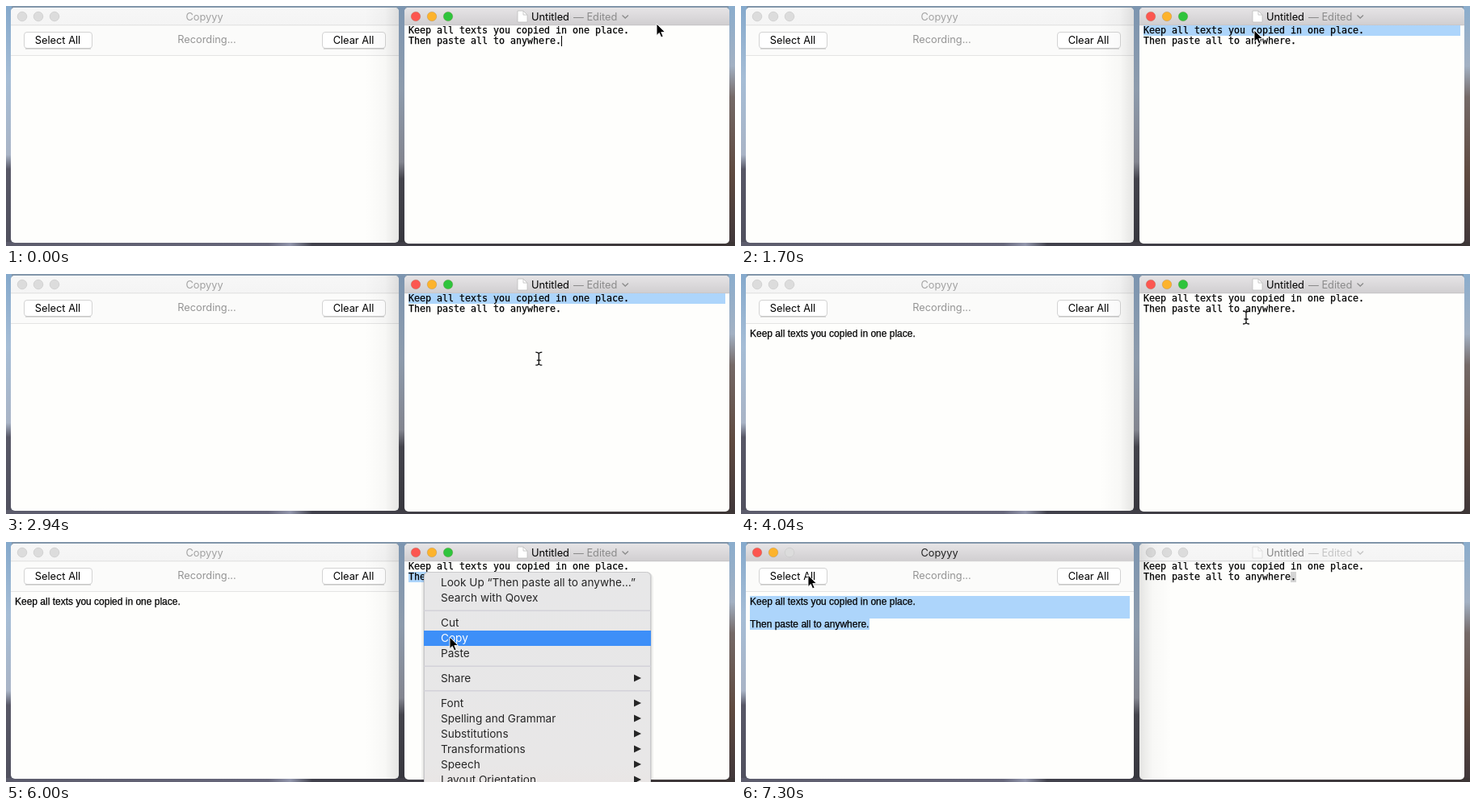
Recreate the animation shown at these times as an HTML page. Size 902x298 px, loop 7.32 s.

```html
<!DOCTYPE html>
<html lang="en">
<head>
<meta charset="utf-8">
<title>Clipboard recorder</title>
<style>
  html, body { margin: 0; width: 100%; height: 100%; overflow: hidden; }
  svg { display: block; width: 902px; height: 298px; }
  text { white-space: pre; }
  .ui { font: 12.8px Inter, Roboto, sans-serif; }
  .menu { font: 13.6px Inter, Roboto, sans-serif; fill: #262626; }
  .mono { font: 11.63px "DejaVu Sans Mono", monospace; }
  .sans { font: 12px "Liberation Sans", sans-serif; }
  .mono, .sans { stroke: #000; stroke-width: .25px; }
  .mid { text-anchor: middle; }
</style>
</head>
<body>
<svg id="stage" viewBox="0 0 902 298"></svg>
<script>
const LOOP = 7320;
const LINE_1 = 'Keep all texts you copied in one place.';
const LINE_2 = 'Then paste all to anywhere.';
const SELECTED = '#add5fb';
const PAPER = '#fefefc';
const stage = document.getElementById('stage');

const rect = (x, y, w, h, fill, extra = '') =>
  `<rect x="${x}" y="${y}" width="${w}" height="${h}" fill="${fill}" ${extra}/>`;
const label = (x, y, cls, str, extra = '') =>
  `<text x="${x}" y="${y}" class="${cls}" ${extra}>${str}</text>`;
const gradient = (id, stops, vertical = true) =>
  `<linearGradient id="${id}" x1="0" y1="0" x2="${vertical ? 0 : 1}" y2="${vertical ? 1 : 0}">` +
  stops.map(([at, color, alpha = 1]) =>
    `<stop offset="${at}" stop-color="${color}" stop-opacity="${alpha}"/>`).join('') +
  '</linearGradient>';

const defs = `<defs>
  ${gradient('barOn', [[0, '#e6e4e6'], [1, '#d0ced0']])}
  ${gradient('barOff', [[0, '#f7f7f7'], [1, '#f4f4f4']])}
  ${gradient('deskLeft', [[0, '#85a9cc'], [.3, '#a5bdd6'], [.62, '#a9b4c6'], [.68, '#575766'], [1, '#50505e']])}
  ${gradient('deskMid', [[0, '#7c95b0'], [.35, '#8d9bac'], [.65, '#83858f'], [.72, '#44444c'], [1, '#36363d']])}
  ${gradient('deskRight', [[0, '#8badcd'], [.25, '#a3b1c3'], [.38, '#756a68'], [.7, '#5f4a40'], [1, '#40373a']])}
  ${gradient('deskFloor', [[0, '#5c5c6c'], [.36, '#66667a'], [.39, '#9195ab'], [.42, '#41414c'], [1, '#3d3636']], false)}
  ${gradient('shadeRight', [[0, '#000', 0], [.6, '#000', .025], [1, '#000', .1]], false)}
  ${gradient('shadeLeft', [[0, '#000', .1], [.4, '#000', .025], [1, '#000', 0]], false)}
  ${gradient('menuFill', [[0, '#e7e7e8'], [.8, '#e8e7e7'], [1, '#ebe3e1']])}
  <clipPath id="clipLeft"><rect x="6" y="2" width="480" height="292" rx="5"/></clipPath>
  <clipPath id="clipRight"><rect x="493" y="2" width="402" height="293" rx="5"/></clipPath>
</defs>`;

const desktop =
  rect(0, 0, 902, 298, '#8397ab') +
  rect(0, 0, 7, 298, 'url(#deskLeft)') +
  rect(485, 0, 9, 298, 'url(#deskMid)') +
  rect(894, 0, 8, 298, 'url(#deskRight)') +
  rect(0, 293, 902, 5, 'url(#deskFloor)');

const lights = (id, x) => `<g id="${id}">` +
  [0, 20, 40].map(dx => `<circle cx="${x + dx}" cy="13" r="5.8" stroke-width=".7"/>`).join('') + '</g>';

const button = (x, w, str) =>
  rect(x + .5, 32.5, w - 1, 20, '#fff', 'rx="3.5" stroke="#d3d3d3"') +
  rect(x + 2, 52.5, w - 4, 1, '#bcbcbc') +
  label(x + w / 2 - .5, 47, 'ui mid', str);

const leftWindow = `<g clip-path="url(#clipLeft)">
  ${rect(6, 2, 480, 292, PAPER)}
  ${rect(6, 24, 480, 38, '#fbfbfa')}
  ${rect(6, 61, 480, 1, '#e4e4e4')}
  ${rect(6, 2, 480, 22, '', 'id="leftBar"')}
  ${rect(6, 23.5, 480, .7, '#d6d6d6')}
  ${lights('leftLights', 20)}
  ${label(245.5, 18, 'ui mid', 'Copyyy', 'id="leftTitle"')}
  ${button(22, 85, 'Select All')}
  ${label(248.5, 46, 'ui mid', 'Recording...', 'fill="#949494"')}
  ${button(391, 79, 'Clear All')}
  <g id="leftSelection">${rect(11, 67, 470, 28, SELECTED)}${rect(11, 95, 148, 14, SELECTED)}</g>
  ${label(11, 78, 'sans', LINE_1, 'id="copied1"')}
  ${label(11, 106, 'sans', LINE_2, 'id="copied2"')}
  ${rect(444, 2, 42, 292, 'url(#shadeRight)', 'id="leftShade"')}
</g>`;

const rightWindow = `<g clip-path="url(#clipRight)">
  ${rect(493, 2, 402, 293, PAPER)}
  ${rect(493, 2, 402, 22, '', 'id="rightBar"')}
  ${rect(493, 23.5, 402, .7, '#c2c0c2')}
  ${lights('rightLights', 507)}
  <g id="rightTitle">
    <path d="M633 6h7l5 5v9h-12z" fill="#fff" stroke="#bdbdbd" stroke-width=".8"/>
    <path d="M640 6v5h5" fill="none" stroke="#bdbdbd" stroke-width=".8"/>
    ${label(650, 18, 'ui', 'Untitled')}
    ${label(702, 18, 'ui', '— Edited', 'fill="#8b8b8b"')}
    <path d="M762.5 11.5l3.7 3.5 3.7-3.5" fill="none" stroke="#8b8b8b" stroke-width="1.3"/>
  </g>
  ${rect(498, 24, 392, 13, SELECTED, 'id="select1"')}
  ${rect(498, 37, 189, 13, SELECTED, 'id="select2"')}
  ${rect(680, 37, 7, 13, '#d4d4d4', 'id="dimSelect"')}
  ${label(498, 34, 'mono', LINE_1)}
  ${label(498, 47, 'mono', LINE_2)}
  ${rect(687, 37, 1, 13, '#000', 'id="caret"')}
  ${rect(493, 2, 40, 293, 'url(#shadeLeft)', 'id="rightShade"')}
</g>`;

// Vertical centres of the rows, relative to the top of the menu.
const ROWS = [13, 32, 63, 82, 101, 132, 163, 182, 201, 220, 239, 258];
const COPY = 3, PASTE = 4;

function menu(id, x, y, width, subject, arrowX, canPaste) {
  const names = [`Look Up “${subject}…”`, 'Search with Qovex', 'Cut', 'Copy', 'Paste', 'Share', 'Font',
    'Spelling and Grammar', 'Substitutions', 'Transformations', 'Speech', 'Layout Orientation'];
  const items = names.map((name, i) => {
    const cy = y + ROWS[i];
    const fill = i === PASTE && !canPaste ? 'fill="#b4b4b4"' : '';
    const arrow = i > PASTE ? `<path d="M${x + arrowX - 4} ${cy - 4.5}l9 4.5-9 4.5z"/>` : '';
    return `<g class="item" ${fill}>${label(x + 21, cy + 5, '', name)}${arrow}</g>`;
  });
  const lines = [48, 117, 147.5].map(dy => rect(x, y + dy - .5, width, 1.5, '#d3d2d9'));
  return `<g id="${id}" class="menu">
    ${rect(x - 3, y + 1, width + 6, 320, '#000', 'rx="7" opacity=".05"')}
    ${rect(x - 1, y, width + 2, 320, '#000', 'rx="6" opacity=".1"')}
    ${rect(x + .5, y + .5, width - 1, 300, 'url(#menuFill)', 'rx="5" stroke="#c9c9cc"')}
    ${lines.join('')}${rect(x, 0, width, 19, '#3d8ff8', 'class="hover"')}${items.join('')}
  </g>`;
}

const cursors = `
  <path id="arrow" d="M0 0v14.5l3.3-3.1 2.3 5.4 2.5-1-2.3-5.3h4.6z" fill="#000" stroke="#fff" stroke-width=".9"/>
  <path id="beam" d="M-4-8q4 0 4 2.5q0-2.5 4-2.5M0-6V6M-4 8q4 0 4-2.5q0 2.5 4 2.5M-2.5 2h5"
    fill="none" stroke="#111" stroke-width="1.3"/>`;

stage.innerHTML = defs + desktop + leftWindow + rightWindow +
  menu('menu1', 636, 27, 273, 'Keep all texts you copie', 256, false) +
  menu('menu2', 517, 37, 281, 'Then paste all to anywhe', 264, true) + cursors;

const $ = id => document.getElementById(id);
const show = (id, on) => $(id).setAttribute('display', on ? 'inline' : 'none');

// time, x, y
const PATH = [
  [0, 805, 22], [250, 805, 22], [1150, 635, 30], [1780, 635, 30], [2300, 660, 106], [2850, 660, 106],
  [3250, 655, 100], [3900, 625, 54], [4150, 625, 54], [4850, 517, 42], [5200, 517, 39], [5480, 517, 39],
  [5820, 549, 118], [6250, 549, 118], [6950, 83, 41], [LOOP, 83, 41]
];

function pointer(t) {
  const i = PATH.findIndex(key => t < key[0]);
  const [t0, x0, y0] = PATH[i - 1], [t1, x1, y1] = PATH[i];
  const u = (t - t0) / (t1 - t0), k = u * u * (3 - 2 * u);
  return [x0 + (x1 - x0) * k, y0 + (y1 - y0) * k];
}

function paintWindow(side, active, colors) {
  $(side + 'Bar').setAttribute('fill', `url(#${active ? 'barOn' : 'barOff'})`);
  [...$(side + 'Lights').children].forEach((dot, i) => {
    const lit = active && colors[i];
    dot.setAttribute('fill', lit || '#dcdcdc');
    dot.setAttribute('stroke', lit ? '#7a5a2b' : '#cbcbcb');
    dot.setAttribute('stroke-opacity', lit ? .3 : 1);
  });
  show(side + 'Shade', !active);
}

function paintMenu(id, top, open, y) {
  show(id, open);
  if (!open) return;
  const over = ROWS.findIndex(cy => Math.abs(y - top - cy) < 9.5);
  const row = over === PASTE && id === 'menu1' ? -1 : over;
  const hover = $(id).querySelector('.hover');
  hover.setAttribute('display', row < 0 ? 'none' : 'inline');
  if (row >= 0) hover.setAttribute('y', top + ROWS[row] - 9);
  $(id).querySelectorAll('.item').forEach((item, i) => {
    item.style.fill = i === row ? '#fff' : '';
  });
}

function draw(t) {
  const within = (a, b) => t >= a && t < b;
  const [x, y] = pointer(t);
  const leftActive = t >= 7040;
  const open1 = within(1780, 2760), open2 = within(5380, 6060);

  paintWindow('left', leftActive, ['#fc5650', '#fdb32c']);
  paintWindow('right', !leftActive, ['#fc5650', '#fdb32c', '#2fc43c']);
  $('leftTitle').setAttribute('fill', leftActive ? '#222' : '#a2a2a2');
  $('rightTitle').setAttribute('opacity', leftActive ? .45 : 1);

  show('caret', t < 1300 && t % 1000 < 560);
  show('select1', within(1300, 3900));
  show('select2', within(5000, 7040));
  show('dimSelect', leftActive);
  show('copied1', t >= 3000);
  show('copied2', t >= 6320);
  show('leftSelection', t >= 7120);
  paintMenu('menu1', 27, open1, y);
  paintMenu('menu2', 37, open2, y);

  const overText = x > 493 && y > 24;
  const beam = overText && !within(1600, 2760) && !within(5250, 6060);
  show('arrow', !beam);
  show('beam', beam);
  $(beam ? 'beam' : 'arrow').setAttribute('transform', `translate(${x.toFixed(1)} ${y.toFixed(1)})`);
}

const start = performance.now();
function tick() {
  draw((performance.now() - start) % LOOP);
  requestAnimationFrame(tick);
}
tick();
</script>
</body>
</html>
```
